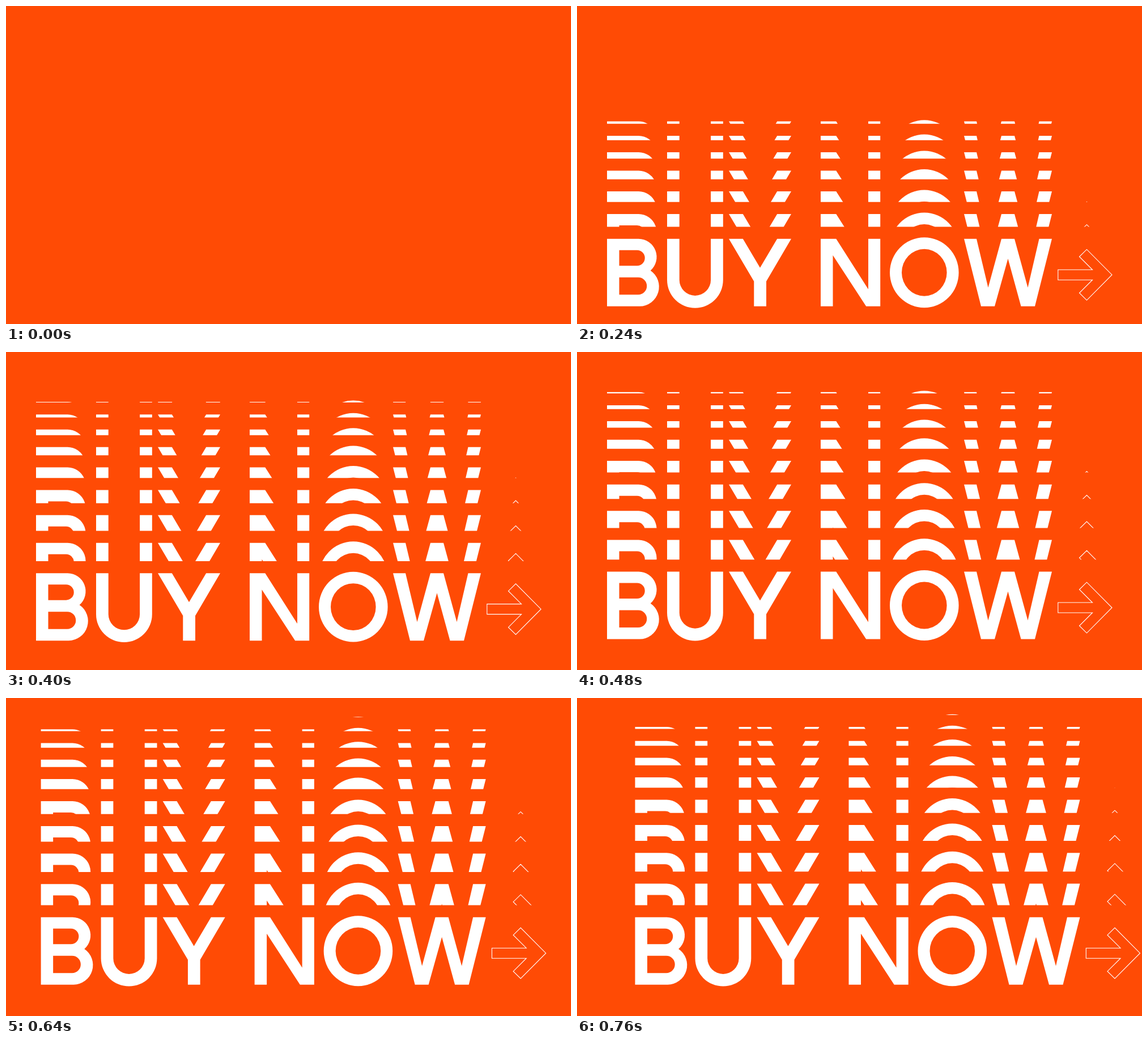
These frames come from a looping animation (997x561 px, 800 ms). An HTML page with a canvas:

```html
<!DOCTYPE html>
<html lang="en">
<head>
<meta charset="utf-8">
<title>Buy now</title>
<style>
  html, body { margin: 0; width: 100%; height: 100%; overflow: hidden; background: #ff4b05; }
  canvas { display: block; }
</style>
</head>
<body>
<canvas id="stage" width="997" height="561" role="img" aria-label="BUY NOW"></canvas>
<script>
const WIDTH = 997, HEIGHT = 561;
const LOOP = 800, STEP = 40;
const GAP = 21.2, MAX_SLICES = 9, OVERSHOOT = 2.5;
const ctx = document.getElementById('stage').getContext('2d');

// Geometric capitals; y = 0 is the cap line, y = 119 the baseline.
const lettering = new Path2D([
  'M53 0H108.7A32 32 0 0 1 129.7 56A34.5 34.5 0 0 1 110.5 119H53Z',
  'M74.5 20V47.5H106a13.75 13.75 0 0 0 0-27.5Z',
  'M74.5 68V98.5H108a15.25 15.25 0 0 0 0-30.5Z',
  'M159 0H180.7V72.5a27.7 27.7 0 0 0 55.4 0V0H257.8V72.5a49.4 49.4 0 0 1-98.8 0Z',
  'M268 0H292.8L323 51L353.2 0H378L334 75V119H312.3V75Z',
  'M430 0H457.3L514 89V0H535.2V119H510.2L451.5 29V119H430Z',
  'M552 59.5a60.8 62 0 0 1 121.6 0a60.8 62 0 0 1-121.6 0Z',
  'M573 59.5a39.8 41.5 0 0 0 79.6 0a39.8 41.5 0 0 0-79.6 0Z',
  'M683 0H705L725.5 86L749 0H772L795.5 86L815.5 0H838L808 119H783.5L760.5 35L737 119H713Z'
].join(''));
const arrow = new Path2D(
  'M848.8 54.5H909.5L886.5 31.5L899.5 18.7L944 63.5L899.5 108.3L886.5 95.5L909.5 72.5H848.8Z');

function drawLine(x, y, visibleHeight) {
  ctx.save();
  ctx.translate(x, y);
  if (visibleHeight !== undefined) {
    ctx.beginPath();
    ctx.rect(0, -6, WIDTH, visibleHeight + 6);
    ctx.clip();
  }
  ctx.fill(lettering, 'evenodd');
  ctx.stroke(arrow);
  ctx.restore();
}

const capLine = t => 386.7 + 49.3 * Math.pow(Math.max(0, 680 - t) / 520, 4.3);
const slideX = t => 49.5 * Math.pow(Math.max(0, t - 480) / 280, 3.12);

function firstSliceHeight(t) {
  const u = t - 160;
  return 38.3 - 24.5 * Math.exp(-0.0055 * u - 4.8e-9 * u ** 3);
}

function draw(t) {
  ctx.fillStyle = '#ff4b05';
  ctx.fillRect(0, 0, WIDTH, HEIGHT);
  if (t < STEP) return;

  ctx.fillStyle = ctx.strokeStyle = '#fff';
  ctx.lineWidth = 1.1;
  const x = slideX(t);
  let y = capLine(t);
  drawLine(x, y);

  // Each slice shows less of the line than the one below it; one joins per step.
  let height = firstSliceHeight(t);
  const shrink = 3 + (height - 13.8) * 0.0795;
  const count = Math.min(MAX_SLICES, Math.floor(t / STEP));
  for (let i = 0; i < count && height > -OVERSHOOT; i++) {
    y -= GAP + height;
    drawLine(x, y, height);
    height -= shrink;
  }
}

const start = performance.now();
function tick() {
  const elapsed = (performance.now() - start) % LOOP;
  draw(Math.floor(elapsed / STEP) * STEP);
  requestAnimationFrame(tick);
}
tick();
</script>
</body>
</html>
```
